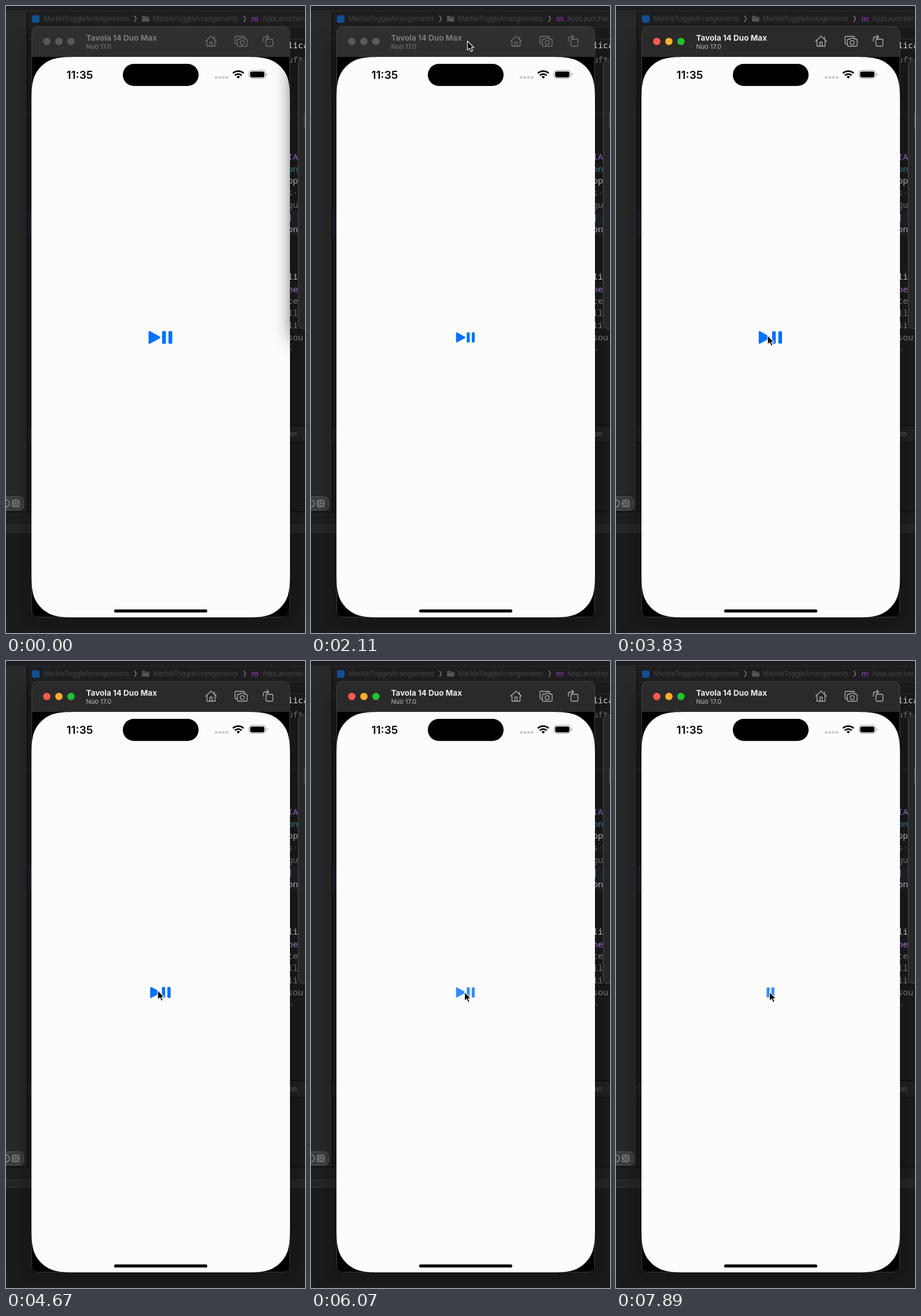
Write an HTML page that moves like this. It is 517 px wide and 1084 px high and loops after 7990 ms.

```html
<!DOCTYPE html>
<html lang="en">
<head>
<meta charset="utf-8">
<title>Button symbol bounce</title>
<style>
html, body { margin: 0; width: 100%; height: 100%; overflow: hidden; background: #1a1a1b; }
svg { display: block; width: 517px; height: 1084px; font-family: Inter, Roboto, sans-serif; }
.crumb { font-size: 11.3px; fill: #464649; }
.code { font: 15px "Noto Sans Mono", "DejaVu Sans Mono", monospace; }
.line { stroke: #0c0c0d; }
.tools { fill: none; stroke: #747477; stroke-width: 1.3; stroke-linejoin: round; stroke-linecap: round; }
.light { fill: #5a5a5c; }
.title { font-size: 13.5px; font-weight: 700; fill: #7b7b7d; }
.sub { font-size: 11px; fill: #7b7b7d; }
.bar { fill: #2f2f30; }
.active .bar { fill: #2b2a2b; }
.active .tools { stroke: #b4b4b6; }
.active .title { fill: #ececed; }
.active .sub { fill: #b9b9bb; }
.active .light:nth-child(1) { fill: #ff5a51; }
.active .light:nth-child(2) { fill: #f8ae2c; }
.active .light:nth-child(3) { fill: #1fc231; }
</style>
</head>
<body>
<svg viewBox="0 0 517 1084">
  <defs>
    <filter id="soft" x="-100%" y="-30%" width="300%" height="160%"><feGaussianBlur stdDeviation="17"/></filter>
    <filter id="drop" x="-20%" y="-20%" width="140%" height="140%"><feGaussianBlur stdDeviation="16"/></filter>
    <!-- top left corner with continuous curvature -->
    <path id="corner" d="M0 87C0 62 0 49.500 4.300 36C9.600 21.300 21.300 9.600 36 4.300C49.500 0 62 0 87 0H224V485H0Z"/>
    <g id="screenShape">
      <use href="#corner" x="44" y="88"/>
      <use href="#corner" transform="translate(491 88) scale(-1 1)"/>
      <use href="#corner" transform="translate(44 1057) scale(1 -1)"/>
      <use href="#corner" transform="translate(491 1057) scale(-1 -1)"/>
    </g>
    <clipPath id="screenClip"><rect x="44" y="88" width="447" height="969" rx="60"/></clipPath>
    <path id="chevron" d="M0 -5Q3 -2 3 0Q3 2 0 5" fill="none" stroke="#7f7f82" stroke-width="1.500"/>
    <rect id="pauseBar" x="-3.25" y="-11" width="6.5" height="22" rx="1.8"/>
  </defs>

  <!-- editor behind -->
  <rect width="517" height="1084" fill="#1b1b1d"/>
  <rect width="517" height="8" fill="#1d1d20"/>
  <rect y="9" width="36" height="865" fill="#282829"/>
  <rect x="37" y="9" width="480" height="27" fill="#1e1e20"/>
  <rect x="37" y="354" width="480" height="42" fill="#20222a"/>
  <rect x="37" y="726" width="480" height="28" fill="#222224"/>
  <rect y="875" width="517" height="22" fill="#1f1f21"/>
  <rect y="898" width="517" height="12" fill="#262628"/>
  <path d="M0 8.5H517M37 36.5H517M37 57.5H517M37 187.5H517" stroke="#2d2d35"/>
  <path class="line" d="M36.5 9V874M37 725.5H517M37 754.5H517M0 874.5H517" stroke-width="1.5"/>
  <path d="M0 897.5H517M0 910.5H517" stroke="#363639"/>
  <path d="M-5 848.5H22Q30.500 848.5 30.500 857V863Q30.500 871.500 22 871.500H-5" fill="#3b3b3d" stroke="#5d5d60"/>
  <g fill="none" stroke="#a5a5a7" stroke-width="1.1">
    <circle cx="0" cy="860" r="6"/>
    <rect x="11" y="854" width="12" height="12" rx="2"/>
    <circle cx="17" cy="860" r="4"/>
    <path d="M15.500 858.500L18.500 861.500M18.500 858.500L15.500 861.500"/>
  </g>
  <rect x="30" y="60" width="475" height="1010" rx="14" opacity=".2" filter="url(#drop)"/>

  <rect x="45" y="16" width="13" height="13" rx="3" fill="#12508f"/>
  <text class="crumb" x="65" y="26">MarbleToggleArrangements</text>
  <use href="#chevron" x="222" y="22"/>
  <path d="M235 18Q235 17 236 17H240L241.500 18.500H247Q248 18.500 248 19.500V26Q248 27 247 27H236Q235 27 235 26ZM235 20.500H248" fill="#58585b" stroke="#2a2a2c" stroke-width=".7"/>
  <text class="crumb" x="254" y="26">MarbleToggleArrangements</text>
  <use href="#chevron" x="411" y="22"/>
  <text x="424" y="26.500" font-size="14" font-weight="700" fill="#74328a">m</text>
  <text class="crumb" x="443" y="26">AppLauncher.m</text>
  <text x="490" y="744" font-size="11" fill="#59595c">on</text>
  <g id="code" class="code"></g>
  <g>
    <path d="M520 93.500H514Q505.500 93.500 505.500 102V549Q505.500 557.500 514 557.500H520" fill="#262628" stroke="#4f4f52"/>
    <path d="M517 186H516V211H517" stroke="#57575a" fill="none"/>
  </g>

  <!-- simulator window -->
  <g id="sim">
    <rect class="bar" x="44.500" y="35.500" width="446" height="1021" rx="10"/>
    <path d="M44 88H491V1047Q491 1057 481 1057H54Q44 1057 44 1047Z"/>
    <rect x="44.500" y="35.500" width="446" height="1021" rx="10" fill="none" stroke="#48484b" stroke-width=".9"/>
    <g>
      <circle class="light" cx="70.500" cy="61.300" r="6.300"/>
      <circle class="light" cx="91.500" cy="61.300" r="6.300"/>
      <circle class="light" cx="112.300" cy="61.300" r="6.300"/>
    </g>
    <text class="title" x="138.500" y="59.500">Tavola 14 Duo Max</text>
    <text class="sub" x="138.500" y="74">Nuo 17.0</text>
    <g class="tools">
      <path d="M345 61L354.500 52L364 61M347.500 59.500V69.500H361.500V59.500M352.500 69.500V62.500H356.500V69.500M360.500 57V53.500"/>
      <path d="M399 65.500H397.500Q396 65.500 396 64V54Q396 52.500 397.500 52.500H411Q412.500 52.500 412.500 54V55"/>
      <path d="M401.500 57.500H404.500L406 55.700H411.500L413 57.500H415.500Q417 57.500 417 59V68Q417 69.500 415.500 69.500H401.500Q400 69.500 400 68V59Q400 57.500 401.500 57.500Z"/>
      <circle cx="408.500" cy="63.300" r="3.400"/>
      <rect x="449.500" y="57.500" width="12" height="12" rx="1.500"/>
      <path d="M445 61V57Q445 53.500 448.500 53.500H454M451 50.500L454.300 53.500L451 56.500"/>
    </g>
    <use href="#screenShape" fill="#fcfcfd"/>
    <g id="cast" clip-path="url(#screenClip)">
      <rect x="498" y="70" width="90" height="505" opacity=".75" filter="url(#soft)"/>
    </g>

    <text x="104.500" y="125.800" font-size="19" font-weight="600">11:35</text>
    <rect x="202" y="100" width="131" height="38.300" rx="19.150"/>
    <g fill="#c6c6c8">
      <rect x="361" y="121.500" width="4.500" height="4" rx="1"/><rect x="367.300" y="121.500" width="4.500" height="4" rx="1"/>
      <rect x="373.600" y="121.500" width="4.500" height="4" rx="1"/><rect x="379.900" y="121.500" width="4.500" height="4" rx="1"/>
    </g>
    <g fill="none" stroke="#000" stroke-width="2.800">
      <path d="M392.300 116.300A13.600 13.600 0 0 1 410.900 116.300M395.700 119.900A8.600 8.600 0 0 1 407.500 119.900"/>
      <path d="M398.600 122.300Q401.600 119.800 404.600 122.300L401.600 125.500Z" fill="#000" stroke="none"/>
    </g>
    <rect x="420.300" y="111.300" width="28.400" height="14" rx="4.500" fill="none" stroke="#9c9c9e" stroke-width="1.100"/>
    <rect x="422.200" y="113.200" width="24.600" height="10.200" rx="2.800"/>
    <path d="M450.300 116Q452 116.800 452 118.300T450.300 120.600Z" fill="#9c9c9e"/>
    <rect x="187" y="1043.300" width="161" height="5.200" rx="2.600"/>

    <g fill="#0072fb">
      <g id="playPause">
        <path d="M-20.500 -9.300Q-20.500 -12 -17.900 -10.700L-1.800 -1.900Q1.200 0 -1.800 1.900L-17.900 10.700Q-20.500 12 -20.500 9.300Z"/>
        <use href="#pauseBar" x="6.200"/><use href="#pauseBar" x="17.200"/>
      </g>
      <g id="pause"><use href="#pauseBar" x="-5"/><use href="#pauseBar" x="5.400"/></g>
    </g>
  </g>

  <path id="cursor" d="M0 0V15.800L3.700 12.500L6.200 18.300L8.900 17.100L6.400 11.500H11.200Z" stroke="#fff" stroke-width="1.100" stroke-linejoin="round"/>
</svg>
<script>
const LOOP = 7990, PERIOD = 760, REST = 0.79;
const $ = id => document.getElementById(id);

// visible ends of the code lines: baseline, text, colour
const lines = [
  [73, "lica", "#d2d2d4"], [98, "uft", "#66666a"], [266, "IA", "#8d62b5"],
  [287, "on", "#2f7f86"], [307, "pp", "#a9a9ad"], [328, "s·", "#5c5c60"],
  [349, "gu", "#5f6e75"], [370, "]", "#76767a"], [391, "on", "#a9a9ad"],
  [473, "li", "#b5b5b8"], [495, "ne", "#9d75c6"], [515, "ce", "#77777a"],
  [536, "ll", "#6d6d78"], [557, "li", "#77777a"], [578, "sou:", "#77777a"],
  [599, "¬", "#48484c"]
];
for (const [y, text, fill] of lines) {
  const el = document.createElementNS("http://www.w3.org/2000/svg", "text");
  el.setAttribute("x", 487);
  el.setAttribute("y", y);
  el.setAttribute("fill", fill);
  el.textContent = text;
  $("code").append(el);
}

// piecewise linear value of a keyed track
function track(keys, t, i = 1) {
  if (t <= keys[0][0]) return keys[0][i];
  for (let k = 1; k < keys.length; k++) {
    const a = keys[k - 1], b = keys[k];
    if (t <= b[0]) return a[i] + (b[i] - a[i]) * (t - a[0]) / (b[0] - a[0]);
  }
  return keys[keys.length - 1][i];
}

const bounce = [[0, 1], [40, .9], [110, .35], [180, .08], [300, 0], [620, 0], [690, .65], [760, 1]];
const path = [
  [1390, 346, -24], [1450, 317.5, 42.5], [1600, 300, 54], [1850, 272, 60], [2057, 270.5, 60.5],
  [2400, 270, 63], [2600, 265, 180], [2850, 257, 420], [3037, 254.5, 510.5], [3300, 259, 555],
  [3600, 262, 569.5], [4900, 262.5, 569.5], [5500, 265.5, 572]
];
const swap = [[6180, 0], [6460, 1]];

// playback holds each third step longer: 100, 20, 20 ms
function stepTime(t) {
  const cycle = Math.floor((t - 50) / 140), rest = t - 50 - cycle * 140;
  const step = rest < 100 ? 0 : rest < 120 ? 1 : 2;
  return Math.max(0, 50 + cycle * 140 + step * 140 / 3);
}

function place(id, scale, alpha) {
  $(id).setAttribute("transform", `translate(267 573) scale(${scale})`);
  $(id).setAttribute("opacity", alpha);
}

function draw(now) {
  const t = stepTime(now % LOOP);
  const size = REST + (t < 5900 ? (1 - REST) * track(bounce, t % PERIOD) : 0);
  const pressed = (t >= 5980 && t < 6180) || t >= 7820;
  const p = track(swap, t), tint = pressed ? .8 : 1;
  const out = Math.max(0, 1 - p * 2), into = Math.max(0, p * 2 - 1);
  place("playPause", size * (.5 + .5 * out), out * tint);
  place("pause", size * (.5 + .5 * into), into * tint);

  $("sim").classList.toggle("active", t >= 2200);
  $("cast").style.display = t < 1990 ? "" : "none";
  $("cursor").style.display = t < 1390 ? "none" : "";
  $("cursor").setAttribute("transform", `translate(${track(path, t, 1)} ${track(path, t, 2)})`);
}

const start = performance.now();
function tick() {
  draw(performance.now() - start);
  requestAnimationFrame(tick);
}
tick();
</script>
</body>
</html>
```
